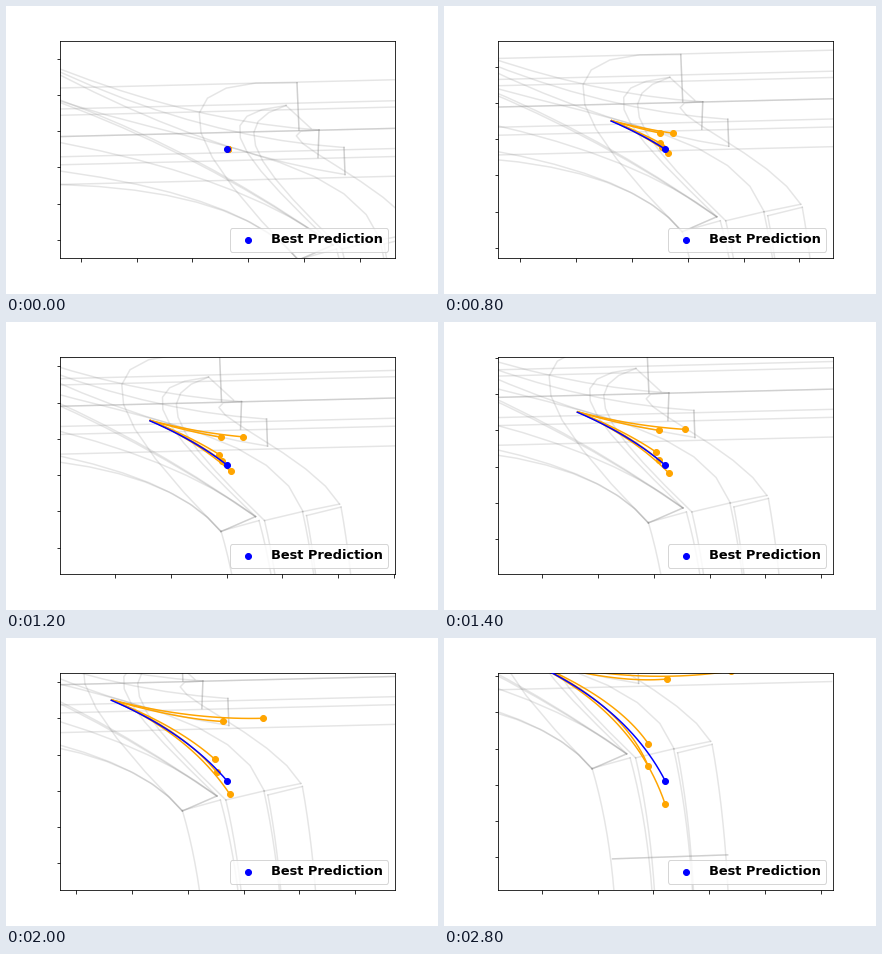
A matplotlib script that plays this animation: 432x288 px, repeating every 2.9 s.

```python
import matplotlib.pyplot as plt
import numpy as np
from matplotlib.animation import FuncAnimation
from matplotlib.ticker import MultipleLocator, NullFormatter

W, H, DPI = 432, 288, 72
FRAMES, INTERVAL = 29, 100
LEFT, RIGHT, TOP, BOTTOM = 54, 388.8, 34.56, 252
CENTER = np.array([(LEFT + RIGHT) / 2, (TOP + BOTTOM) / 2])
FAR_X, FAR_Y = 532, 378  # how far the view travels right and down

fig = plt.figure(figsize=(W / DPI, H / DPI), dpi=DPI, facecolor="white")
ax = fig.add_axes([LEFT / W, 1 - BOTTOM / H,
                   (RIGHT - LEFT) / W, (BOTTOM - TOP) / H])
for axis, step, first in ((ax.xaxis, (RIGHT - LEFT) / 6, 74.8),
                          (ax.yaxis, (BOTTOM - TOP) / 6, 52.6)):
    axis.set_major_locator(MultipleLocator(step, offset=first))
    axis.set_major_formatter(NullFormatter())


# World units are pixels of the opening view, y pointing down.
def road(*points):
    ax.plot(*np.array(points).T, color="gray", alpha=0.2, lw=1.5, zorder=1)


def bend(*controls, pieces=9):
    """Bezier curve of any degree, drawn as a polyline."""
    t = np.linspace(0, 1, pieces + 1)[:, None]
    level = [np.array(c) for c in controls]
    while len(level) > 1:
        level = [a + (b - a) * t for a, b in zip(level, level[1:])]
    road(*level[0])


def draw_straights():
    for y in (82, 103, 109.3, 130.6, 130.6, 150.8, 158.8, 178.5):
        road((LEFT, y), (FAR_X, y - 11.8))


def draw_merging():
    lane_ends = (313, 124), (338, 141.5), (339, 168.5)
    for k, end in enumerate(lane_ends):
        bend((LEFT, 63 + 3 * k), (190 + 8 * k, 116 + 16 * k), end)
    for _ in range(2):
        road((291, 76.8), (293, 124))
        road((313, 124), (312, 151.5))
        road((338, 141.5), (339, 168.5))


def draw_turns():
    inner, outer = (292.5, 254), (327, 239)
    middle, last = (374.5, 234), (411, 226.5)

    # Lanes arriving from the left
    bend((LEFT, 165), (243, 191), inner)
    bend((LEFT, 178.5), (235, 184), inner)
    bend((LEFT, 136.5), (240, 172), outer)
    for y in (94, 96.5):
        bend((LEFT, y), (195, y + 52), outer)
    bend((LEFT, 95), (190, 140), (345, 150), middle)

    # Lanes turning back from the right
    peak = (280, 99.5)
    bend((291, 76.8), (150, 70), (170, 130), inner)
    bend(peak, (195, 108), (235, 150), outer)
    bend(peak, (218, 118), (250, 160), (336, 243))
    bend((313, 124), (235, 122), (380, 172), last)
    road(peak, (305, 122.5))

    for _ in range(2):
        road(inner, outer)
    road(middle, last)


def draw_exits():
    tops = (((292.5, 253.5), (330.5, 243)),
            ((336, 243), (374, 234)),
            ((378, 238), (412.5, 229.5)))
    for k, sides in enumerate(tops):
        road(*sides)
        drift = 22 - 3 * k
        for x, y in sides:
            knee = (x + 0.75 * drift, y + 0.45 * (FAR_Y - y))
            bend((x, y), knee, (x + drift, FAR_Y))
    for _ in range(2):
        road((313, 344), (428, 340))


for draw in (draw_straights, draw_merging, draw_turns, draw_exits):
    draw()


def travel(speed, gain):
    """Steady speed that grows or fades evenly with time."""
    t = np.arange(FRAMES)[:, None]
    return t * (np.array(speed) + np.array(gain) * t)


best = CENTER + travel((7.43, 3.18), (-0.0812, 0.0435))

# Drift of every other prediction away from the best one
DRIFTS = [
    ((-1.0, -1.3), (0.037, -0.0835)),
    ((0.4, -1.15), (0.069, -0.099)),
    ((-0.75, -0.5), (0.0045, -0.0295)),
    ((-0.37, -0.17), (-0.0095, -0.0135)),
    ((0.45, 0.33), (-0.017, 0.0175)),
]
others = [best + (0.4, -0.4) + travel(*drift) for drift in DRIFTS]


def track(path, color, z, label=None):
    line, = ax.plot([], [], color=color, lw=1.5, zorder=z)
    dot = ax.scatter([0], [0], color=color, s=36, zorder=z, label=label)
    return line, dot, path


tracks = [track(path, "orange", 2) for path in others]
tracks.append(track(best, "blue", 3, "Best Prediction"))
ax.legend(loc="lower right", scatterpoints=1,
          prop={"family": "DejaVu Sans", "weight": "bold", "size": 13})


def update(i):
    for line, dot, path in tracks:
        line.set_data(*path[:i + 1].T)
        dot.set_offsets(path[i:i + 1])
    dx, dy = best[i] - CENTER
    ax.set_xlim(LEFT + dx, RIGHT + dx)
    ax.set_ylim(BOTTOM + dy, TOP + dy)
    return []


anim = FuncAnimation(fig, update, frames=FRAMES, interval=INTERVAL,
                     repeat=True, repeat_delay=0)
plt.show()
```
